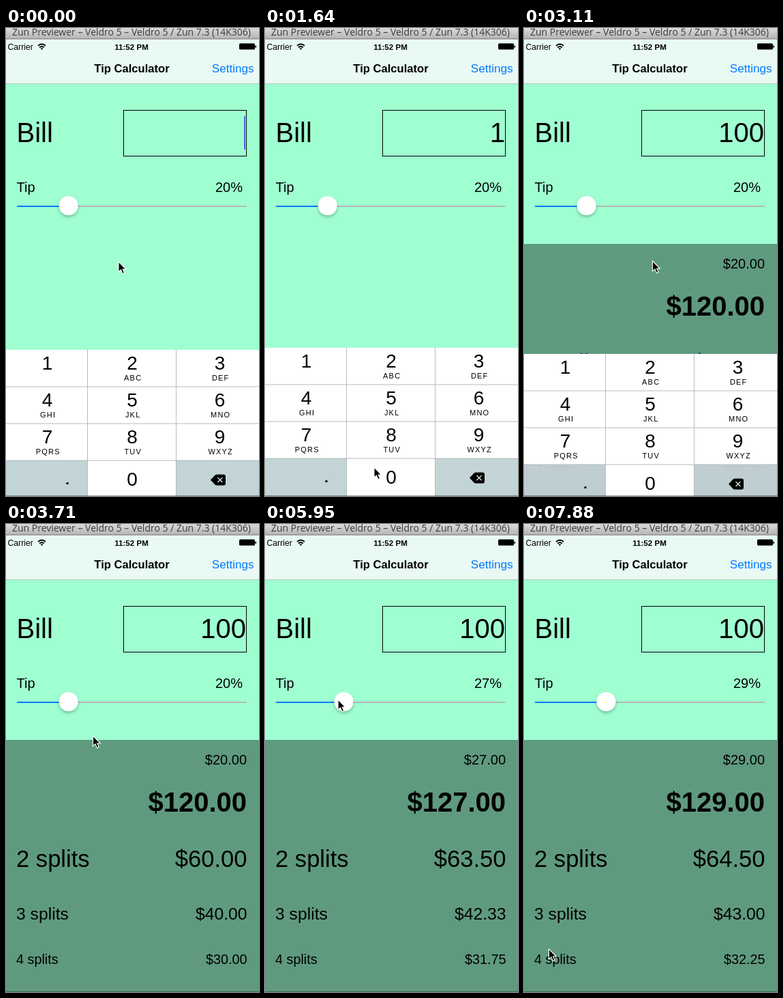
These frames come from a looping animation (371x685 px, 8000 ms). An HTML page:

```html
<!DOCTYPE html>
<html lang="en">
<head>
<meta charset="utf-8">
<title>Tip Calculator</title>
<style>
html, body { margin: 0; width: 100%; height: 100%; overflow: hidden; background: #9fffd1; }
svg { display: block; width: 100vw; height: 100vh; }
text { font-family: "Liberation Sans", Arial, sans-serif; white-space: pre; }
</style>
</head>
<body>
<svg id="stage" viewBox="0 0 371 685">
  <defs>
    <linearGradient id="chrome" x2="0" y2="1">
      <stop offset="0" stop-color="#dadada"/>
      <stop offset="1" stop-color="#b4b4b4"/>
    </linearGradient>
    <filter id="shade" x="-50%" y="-50%" width="200%" height="200%">
      <feDropShadow dx="0" dy="2.5" stdDeviation="2" flood-opacity=".27"/>
    </filter>
  </defs>
</svg>
<script>
const LOOP = 8000, TICK = 148.7;
const BLUE = '#007aff', GREY_KEY = 'rgba(197,210,215,.94)', LINE = '#b3bcbe';
const stage = document.getElementById('stage');

function el(tag, attrs, parent = stage) {
  const node = document.createElementNS('http://www.w3.org/2000/svg', tag);
  for (const name in attrs) node.setAttribute(name, attrs[name]);
  parent.appendChild(node);
  return node;
}
const rect = (x, y, width, height, fill, parent, more) =>
  el('rect', { x, y, width, height, fill, ...more }, parent);
const path = (d, more, parent) => el('path', { d, ...more }, parent);
function text(str, x, y, size, more, parent) {
  const node = el('text', { x, y, 'font-size': size, ...more }, parent);
  node.textContent = str;
  return node;
}
const END = { 'text-anchor': 'end' }, MID = { 'text-anchor': 'middle' };
const BOLD = { 'font-weight': 700 };
const show = (node, on) => node.setAttribute('visibility', on ? 'visible' : 'hidden');

// Page
rect(0, 0, 371, 685, '#9fffd1');
text('Bill', 15.5, 167, 40);
rect(172.5, 120.5, 180, 67, 'none', stage, { stroke: '#000' });
const bill = text('', 352, 167, 40, END);
const caret = rect(349, 129, 2, 49, '#3f6bd6');
text('Tip', 15.5, 240, 20);
const percent = text('', 347, 240, 20, END);

// Slider
rect(16, 260, 337, 2, '#b4b7b5', stage, { rx: 1 });
const filled = rect(16, 260, 76, 2, BLUE, stage, { rx: 1 });
const knob = el('circle', { cy: 260, r: 14, fill: '#fff', filter: 'url(#shade)' });

// Results
const panel = el('g', {});
rect(0, 316, 371, 369, '#5f9a7f', panel);
const tip = text('', 353, 352, 20, END, panel);
const total = text('', 353, 420.5, 40, { ...END, ...BOLD }, panel);
const shares = [[2, 502, 34.6], [3, 579, 24.7], [4, 644, 19.8]].map(([n, y, size]) => {
  text(n + ' splits', 15, y, size, {}, panel);
  return { n, node: text('', 353.5, y, size, END, panel) };
});
text('5 splits', 15, 696.5, 16, {}, panel);

// Keypad, laid out from its own top edge
const pad = el('g', {});
const COLS = [0, 119.5, 249.5, 371], MIDS = [60.5, 185, 313.5];
const LETTERS = ['', 'ABC', 'DEF', 'GHI', 'JKL', 'MNO', 'PQRS', 'TUV', 'WXYZ'];
const keys = {};
function key(name, col, row, fill) {
  keys[name] = rect(COLS[col], row * 54, COLS[col + 1] - COLS[col], row === 3 ? 60 : 54, fill, pad);
}
LETTERS.forEach((letters, i) => {
  const col = i % 3, row = Math.floor(i / 3);
  key(i + 1, col, row, '#fff');
  text(i + 1, MIDS[col], row * 54 + 29, 28, MID, pad);
  text(letters, MIDS[col] + 1.2, row * 54 + 45, 11, { ...MID, 'letter-spacing': 1.2 }, pad);
});
key('dot', 0, 3, GREY_KEY);
key(0, 1, 3, '#fff');
key('del', 2, 3, GREY_KEY);
rect(88.500, 194, 3, 3, '#000', pad);
text('0', MIDS[1], 198.5, 28, MID, pad);
path('M300 190.5L306.5 183.6Q308 182.5 309.5 182.5H319Q322 182.5 322 185.5V195.5Q322 198.5 319 198.5H309.5Q308 198.5 306.5 197.4Z', {}, pad);
path('M310.5 187L317.5 194M317.5 187L310.5 194', { stroke: '#dfe9ea', 'stroke-width': 1.3 }, pad);
for (const y of [54, 108, 162]) rect(0, y - .5, 371, 1, LINE, pad);
for (const x of [119, 249]) rect(x, 0, 1, 222, LINE, pad);

// Navigation and status bars
rect(0, 16, 371, 65, '#e9f9f4');
rect(0, 81, 371, 1, '#b0cbc0');
text('Tip Calculator', 184.5, 65, 16.6, { ...MID, ...BOLD });
text('Settings', 363.5, 65, 17.1, { ...END, fill: BLUE });
text('Carrier', 2.5, 31.5, 12.2);
text('11:52 PM', 184, 31.5, 11.6, { ...MID, ...BOLD });
const wave = { fill: 'none', stroke: '#000', 'stroke-width': 1.8 };
path('M47 26Q52.5 21 58 26', wave);
path('M49.2 28.5Q52.5 25.4 55.8 28.5', wave);
path('M50.6 29.9Q52.5 28.4 54.4 29.9L52.5 32Z');
rect(342, 22.5, 23, 9, '#000', stage, { rx: 1.5 });
rect(365.5, 25.5, 1.5, 3.5, '#000', stage, { rx: .7 });

// Window chrome
rect(0, 0, 371, 16, 'url(#chrome)');
rect(0, 15.5, 371, 1, '#777');
text('Zun Previewer – Veldro 5 – Veldro 5 / Zun 7.3 (14K306)', 184, 11, 14,
  { ...MID, fill: '#3c3c3c', style: 'font-family: "Open Sans", sans-serif' });
rect(0, 684, 371, 1, '#000', stage, { opacity: .35 });

const pointer = path('M0 0V15L3.5 11.9L6 17.7L8.6 16.6L6.2 11H10.8Z',
  { stroke: '#fff', 'stroke-width': 1.1 });

// Moves: [start tick, end tick, ...destination]
const POINTER_START = [165, 342];
const POINTER_MOVES = [
  [0, 5, 67, 477],        // to key 1
  [7, 11, 160, 643],      // to key 0
  [17, 20, 188.5, 341],   // tap the page
  [23, 25, 127.5, 310],
  [25, 28, 83, 257],      // grab the knob
  [46, 47, 112, 259],     // let go
  [47, 52, 10, 604],
  [52, 53, 36.5, 622]
];
const RATE_MOVES = [[28, 32, 34.7], [36, 42, 24.2], [43, 46, 29.3]];

const clamp = p => Math.max(0, Math.min(1, p));
const linear = p => p;
const easeIn = p => p * p;
const easeOut = p => p * (2 - p);

function follow(from, moves, k, ease) {
  return moves.reduce((pos, [a, b, ...to]) => {
    const p = ease(clamp((k - a) / (b - a)));
    return pos.map((v, i) => v + (to[i] - v) * p);
  }, from);
}
const money = v => '$' + v.toFixed(2);

function draw(ms) {
  const k = Math.min(53, Math.floor((ms + 14) / TICK));
  const [px, py] = follow(POINTER_START, POINTER_MOVES, k, easeOut);
  const [rate] = follow([20], RATE_MOVES, k, linear);
  const top = Math.round(468 + 3 * clamp(1 - k) + 217 * easeIn(clamp((k - 20.4) / 3)));
  const pct = Math.floor(rate), sum = 100 + pct, cx = 29.7 + 3.1 * rate;
  const dragging = k >= 28 && k <= 46, done = k >= 21;

  pointer.setAttribute('transform', `translate(${dragging ? cx - 8.5 : px} ${py})`);
  knob.setAttribute('cx', cx);
  filled.setAttribute('width', cx - 16);
  pad.setAttribute('transform', `translate(0 ${top})`);
  show(pad, top < 685);
  keys[1].setAttribute('fill', k === 5 || k === 6 ? GREY_KEY : '#fff');
  keys[0].setAttribute('fill', k === 16 || k === 17 ? GREY_KEY : '#fff');

  bill.textContent = '100'.slice(0, (k >= 7) + (k >= 13) + (k >= 16));
  show(caret, !done && (k % 8 < 2 || k % 8 > 4));
  show(panel, done);
  percent.textContent = pct + '%';
  tip.textContent = money(pct);
  total.textContent = money(sum);
  for (const { n, node } of shares) node.textContent = money(sum / n);
}

const start = performance.now();
function loop() {
  draw((performance.now() - start) % LOOP);
  requestAnimationFrame(loop);
}
loop();
</script>
</body>
</html>
```
